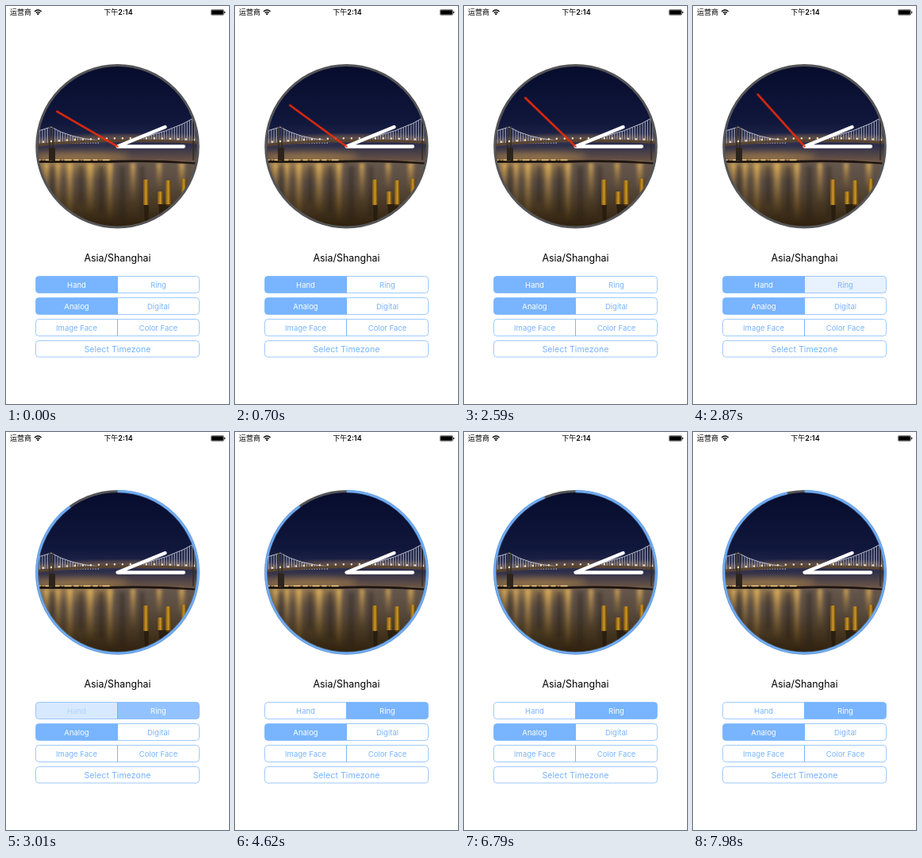
Recreate the animation shown at these times as an HTML page. Size 281 by 500 pixels, loop 8 s.

```html
<!DOCTYPE html>
<html lang="en">
<head>
<meta charset="utf-8">
<title>World clock</title>
<style>
  html, body { margin: 0; width: 100%; height: 100%; overflow: hidden; background: #fff; }
  svg { display: block; width: 281px; height: 500px; }
  text { text-anchor: middle; font-family: Inter, "Liberation Sans", sans-serif; }
  .status { font: 9px "Noto Sans CJK SC", "Noto Sans CJK", "Noto Sans CJK JP", sans-serif; }
  .time { font: 500 9px Inter, "Noto Sans CJK SC", "Noto Sans CJK", "Noto Sans CJK JP", sans-serif; }
  .time tspan { font-weight: 600; }
  .zone { font-size: 12.4px; }
  .label { font-size: 9.5px; fill: #78b4ff; }
  .wide { font-size: 10.7px; }
  .on { fill: #fff; }
  .half { fill: #78b4ff; }
  .frame { fill: none; stroke: #78b4ff; stroke-width: .7; }
  .divider { stroke-width: 1; }

  .second, .ring, .fade { animation: 8s linear infinite; }
  .second { transform-origin: 140.5px 176.5px; animation-name: sweep; animation-timing-function: ease-in-out; }
  .ring { stroke-dasharray: 60 60; animation-name: fill; animation-timing-function: ease-in-out; }
  .second-fade { animation-name: second-out; }
  .ring-fade { animation-name: ring-in; }
  .left-bg { animation-name: left-off; }
  .right-bg { animation-name: right-on; }
  .left-text { animation-name: left-text; }
  .right-text { animation-name: right-text; }

  /* one tick is 6 degrees, eased over about a third of a second */
  @keyframes sweep {
    0%, 4.375% { transform: rotate(300deg); }
    8.75%, 17.5% { transform: rotate(306deg); }
    21.875%, 30.625% { transform: rotate(312deg); }
    35%, 100% { transform: rotate(318deg); }
  }
  /* the remaining seconds of the minute */
  @keyframes fill {
    0%, 56.875% { stroke-dashoffset: 6; }
    61.25%, 70% { stroke-dashoffset: 5; }
    74.375%, 83.4% { stroke-dashoffset: 4; }
    87.5%, 96.6% { stroke-dashoffset: 3; }
    100% { stroke-dashoffset: 2.05; }
  }
  @keyframes second-out { 0%, 35.875% { opacity: 1; } 37.6%, 100% { opacity: 0; } }
  @keyframes ring-in { 0%, 35.875% { opacity: 0; } 37.6%, 100% { opacity: 1; } }
  @keyframes left-off { 0%, 36% { opacity: 1; } 37.6% { opacity: .3; } 39.4%, 100% { opacity: 0; } }
  @keyframes right-on { 0%, 35% { opacity: 0; } 35.875% { opacity: .16; } 37.6% { opacity: .8; } 39.4%, 100% { opacity: 1; } }
  @keyframes left-text { 0%, 36% { fill: #fff; } 37.6% { fill: #b2d4ff; } 39.4%, 100% { fill: #78b4ff; } }
  @keyframes right-text { 0%, 35.875% { fill: #78b4ff; } 37.6%, 100% { fill: #fff; } }
</style>
</head>
<body>
<svg viewBox="0 0 281 500">
  <defs>
    <linearGradient id="sky" x2="0" y2="1">
      <stop offset="0" stop-color="#070c2c"/>
      <stop offset=".6" stop-color="#10173c"/>
      <stop offset=".82" stop-color="#262a4c"/>
      <stop offset="1" stop-color="#6b5544"/>
    </linearGradient>
    <linearGradient id="water" x2="0" y2="1">
      <stop offset="0" stop-color="#67584d"/>
      <stop offset=".35" stop-color="#584a3e"/>
      <stop offset=".65" stop-color="#473722"/>
      <stop offset="1" stop-color="#2b1e0c"/>
    </linearGradient>
    <linearGradient id="glow" x2="0" y2="1">
      <stop offset="0" stop-color="#edbb60" stop-opacity=".8"/>
      <stop offset="1" stop-color="#a87a28" stop-opacity="0"/>
    </linearGradient>
    <linearGradient id="pile">
      <stop offset="0" stop-color="#7a5410"/>
      <stop offset=".5" stop-color="#c8942a"/>
      <stop offset="1" stop-color="#553808"/>
    </linearGradient>
    <pattern id="cables" width="3.2" height="50" patternUnits="userSpaceOnUse">
      <path d="M1 0V50" stroke="#a9acbd" stroke-width="1"/>
    </pattern>
    <filter id="soft" x="-100%" width="300%"><feGaussianBlur stdDeviation="2"/></filter>
    <filter id="haze" x="-20%" width="140%" y="-200%" height="500%"><feGaussianBlur stdDeviation="4"/></filter>
    <clipPath id="face"><circle cx="140.5" cy="176.2" r="102"/></clipPath>
    <rect id="post" width="7" height="32" rx="1.5" fill="url(#pile)"/>
  </defs>

  <text class="status" x="18.5" y="11">运营商</text>
  <g fill="none" stroke="#000" stroke-width="1.3">
    <path d="M36 7Q40.3 3 44.6 7M37.8 8.8Q40.3 6.5 42.8 8.8"/>
    <circle cx="40.3" cy="10.2" r=".5"/>
  </g>
  <text class="time" x="141.5" y="11">下午<tspan>2:14</tspan></text>
  <rect x="258.3" y="4.6" width="16.2" height="6.8" rx="1.2" fill="none" stroke="#000" stroke-width=".5"/>
  <rect x="259" y="5.3" width="14.8" height="5.4" rx=".6"/>
  <rect x="275.2" y="6.8" width="1" height="2.4" rx=".5"/>

  <g clip-path="url(#face)">
    <rect x="37" y="73" width="208" height="122" fill="url(#sky)"/>
    <ellipse cx="95" cy="189" rx="60" ry="5" fill="#c4954e" opacity=".6" filter="url(#haze)"/>
    <path d="M37 167Q140 158 245 164V172Q140 167 37 175Z" fill="#b98b52" opacity=".4" filter="url(#soft)"/>
    <rect x="37" y="195" width="208" height="85" fill="url(#water)"/>

    <g fill="url(#glow)" filter="url(#soft)">
      <rect x="38" y="196" width="98" height="24" opacity=".5"/>
      <rect x="48" y="197" width="6" height="42"/>
      <rect x="63" y="197" width="5" height="58"/>
      <rect x="77" y="197" width="7" height="72"/>
      <rect x="102" y="197" width="8" height="65"/>
      <rect x="128" y="197" width="6" height="74"/>
      <rect x="157" y="197" width="6" height="50"/>
      <rect x="190" y="197" width="6" height="34"/>
      <rect x="218" y="197" width="7" height="36"/>
    </g>
    <g fill="#211a1a" opacity=".38" filter="url(#soft)">
      <rect x="56" y="201" width="4" height="50"/>
      <rect x="92" y="201" width="5" height="46"/>
      <rect x="117" y="201" width="6" height="58"/>
      <rect x="143" y="201" width="7" height="66"/>
      <rect x="169" y="201" width="5" height="60"/>
    </g>
    <path d="M37 194H130Q185 192 245 197V199Q180 195 130 197H37Z" fill="#1c130f"/>
    <path d="M38 193.5H132" stroke="#f3cd81" stroke-width="1.5" stroke-linecap="round" stroke-dasharray="5 4 0 3 8 4"/>

    <path d="M37 158L57 152Q80 166 118 169V173H37ZM150 169Q205 161 245 136V170H150Z" fill="url(#cables)"/>
    <path d="M37 158L57 152Q80 166 118 169M150 169Q205 161 245 136" fill="none" stroke="#bbbccb" stroke-width="1"/>
    <path d="M37 174.5Q140 165.5 245 171.5" fill="none" stroke="#59442f" stroke-width="3"/>
    <path d="M37 171.5Q140 162.5 245 168.5" fill="none" stroke="#ffe2a6" stroke-width="2.5" stroke-linecap="round" stroke-dasharray="0 10"/>
    <path d="M55 151V195M59 151V195M55 180L59 188M59 180L55 188M236 140V194" stroke="#30291f" stroke-width="1.4"/>
    <path d="M54 178H62V194H54Z" fill="#2c241c"/>

    <use href="#post" x="173" y="218"/>
    <use href="#post" transform="translate(191 233) scale(1 .5)"/>
    <use href="#post" x="201" y="219"/>
    <use href="#post" transform="translate(221 217) scale(.9 .85)"/>
    <path d="M174 250H180L179 275H175ZM192 249H207L204 268H194ZM221 244H227L226 266H222Z" fill="#1f1508" opacity=".65"/>
  </g>

  <g fill="none" stroke-width="3">
    <circle cx="140.5" cy="176.2" r="101.75" stroke="#555557"/>
    <g class="fade ring-fade">
      <circle class="ring" cx="140.5" cy="176.2" r="101.75" pathLength="60" stroke="#6daffd" transform="rotate(-90 140.5 176.2)"/>
    </g>
  </g>
  <path d="M200.5 152L140.5 176.5H224" fill="none" stroke="#fff" stroke-width="4.3" stroke-linecap="round" stroke-linejoin="round"/>
  <g class="fade second-fade">
    <path class="second" d="M140.5 176.5V88.5" stroke="#f02a08" stroke-width="2.4" stroke-linecap="round"/>
  </g>

  <text class="zone" x="140.5" y="321">Asia/Shanghai</text>

  <path class="half fade left-bg" d="M140.5 339.5H41.5a4 4 0 0 0-4 4v13a4 4 0 0 0 4 4H140.5Z"/>
  <path class="half fade right-bg" d="M140.5 339.5H239.5a4 4 0 0 1 4 4v13a4 4 0 0 1-4 4H140.5Z"/>
  <path class="half" d="M140.5 366.5H41.5a4 4 0 0 0-4 4v13a4 4 0 0 0 4 4H140.5Z"/>
  <g class="frame">
    <rect x="37.5" y="339.5" width="206" height="21" rx="4"/>
    <rect x="37.5" y="366.5" width="206" height="21" rx="4"/>
    <rect x="37.5" y="393.5" width="206" height="21" rx="4"/>
    <rect x="37.5" y="420.5" width="206" height="20.5" rx="4"/>
    <path class="divider" d="M140.5 339.5v21M140.5 366.5v21M140.5 393.5v21"/>
  </g>
  <text class="label fade left-text" x="89" y="353.5">Hand</text>
  <text class="label fade right-text" x="192" y="353.5">Ring</text>
  <text class="label on" x="89" y="380.5">Analog</text>
  <text class="label" x="192" y="380.5">Digital</text>
  <text class="label" x="89" y="407.5">Image Face</text>
  <text class="label" x="192" y="407.5">Color Face</text>
  <text class="label wide" x="140.5" y="435">Select Timezone</text>
</svg>
</body>
</html>
```
